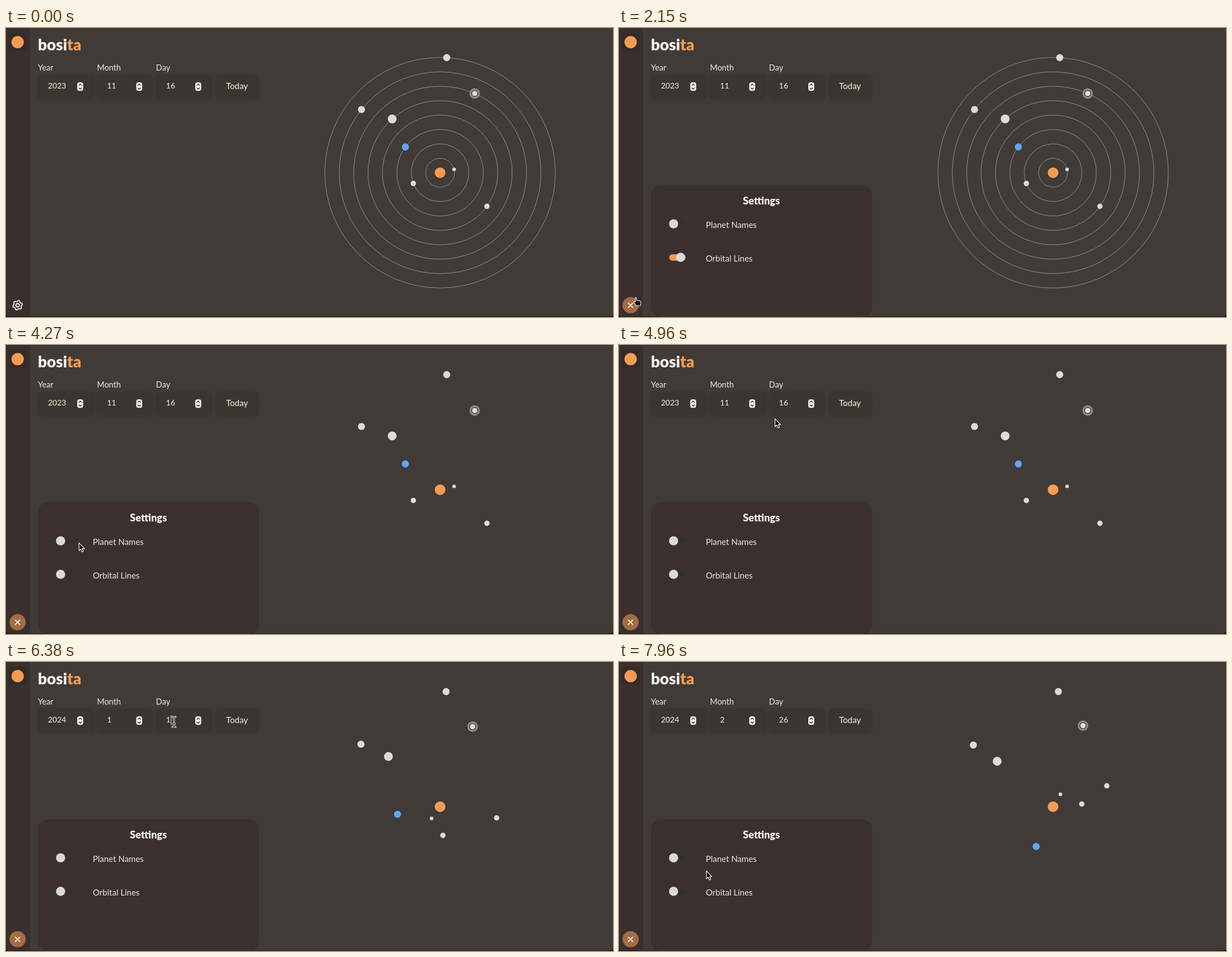
Write an HTML page that moves like this. It is 1084x516 px and loops after 8000 ms.

```html
<!DOCTYPE html>
<html lang="en">
<head>
<meta charset="utf-8">
<title>Orrery</title>
<style>
  html, body { margin: 0; width: 100%; height: 100%; overflow: hidden; background: #1b1817; }
  svg { display: block; width: 1084px; height: 516px; font-family: Lato, "Open Sans", sans-serif; }
  .label { font-size: 14.5px; fill: #e9e7e5; }
  .value { font-size: 14px; fill: #fbf3d9; }
  .row { font-size: 15px; fill: #e9e7e5; }
  .head { font-size: 18.2px; font-weight: 900; fill: #f1efee; }
  .title { font-size: 28px; font-weight: 900; fill: #f3f1f0; }
  .field { fill: #3a3531; filter: drop-shadow(0 1px 2px rgba(0, 0, 0, .16)); }
  .line { fill: none; stroke-linecap: round; stroke-linejoin: round; }
  .ink { fill: #111; stroke: #fff; stroke-width: 1.1; stroke-linejoin: round; }
</style>
</head>
<body>
<svg id="stage" viewBox="0 0 1084 516" xmlns="http://www.w3.org/2000/svg">
  <path d="M0 0H1084V509a6 6 0 0 1-6 6H6a6 6 0 0 1-6-6z" fill="#403b37"/>
  <path d="M0 0H43V515H6a6 6 0 0 1-6-6z" fill="#392f2d"/>
  <rect x="5" y="9" width="32" height="32" rx="5" fill="#342b28"/>
  <circle cx="20.8" cy="25.2" r="11" fill="#f59b54"/>

  <text class="title" x="57" y="39.5">bosi<tspan fill="#f59b54">ta</tspan></text>
  <g id="form"></g>
  <text class="row" x="393" y="108.5" style="fill:#fbf3d9">Today</text>
  <path id="caret" d="M0 95V113" stroke="#f3efe2"/>

  <g id="panel">
    <rect x="57" y="281" width="395" height="235" rx="18" fill="#3a302e"/>
    <text class="head" x="254.3" y="314.7" text-anchor="middle">Settings</text>
    <text class="row" x="155" y="357">Planet Names</text>
    <text class="row" x="155" y="417">Orbital Lines</text>
    <g id="switches"></g>
  </g>

  <circle id="hover" cx="20.7" cy="495" r="14.5" fill="#a56c42"/>
  <g id="gear" class="line" stroke="#f1efee" stroke-width="1.8"></g>
  <path id="cross" class="line" d="M16.6 491.2l8 8m0-8l-8 8" stroke="#f4f1ef" stroke-width="1.9"/>

  <g id="orbits" fill="none" stroke="#928e8b"></g>
  <circle cx="775.2" cy="258.4" r="9.5" fill="#f59b54"/>
  <g id="planets"></g>

  <g id="pointer">
    <path id="arrow" class="ink" d="M0 0V14L3.2 11.2 5.4 16.2 7.8 15.2 5.7 10.3H10z"/>
    <path id="hand" class="ink" d="M-1 8V1Q0-1 1 1V5L7 6 9 8V11L8 15H1L-4 8-2 7z"/>
    <g id="beam" class="line"></g>
  </g>
</svg>
<script>
const $ = id => document.getElementById(id);
const LOOP = 8000, CX = 775.2, CY = 258.4, GAP = 25.73, RAD = Math.PI / 180;

function add(parent, tag, attrs, text) {
  const el = document.createElementNS('http://www.w3.org/2000/svg', tag);
  for (const k in attrs) el.setAttribute(k, attrs[k]);
  if (text) el.textContent = text;
  return parent.appendChild(el);
}
const show = (el, on) => { el.style.display = on ? '' : 'none'; };
const clamp = (v, lo, hi) => Math.max(lo, Math.min(hi, v));

// date fields and the button
const form = $('form');
const values = ['Year', 'Month', 'Day'].map((name, i) => {
  const x = 57 + i * 105.4;
  add(form, 'text', { class: 'label', x, y: 76 }, name);
  add(form, 'rect', { class: 'field', x, y: 84, width: 100, height: 41, rx: 6 });
  add(form, 'rect', { x: x + 70.2, y: 97, width: 10.6, height: 15.2, rx: 4, fill: '#f4f3f2' });
  add(form, 'path', {
    class: 'line', stroke: '#2a2725', 'stroke-width': 1.3,
    d: `M${x + 73.2} 102.4l2.3-2.4 2.3 2.4m-4.6 4.6l2.3 2.4 2.3-2.4`
  });
  return add(form, 'text', { class: 'value', x: x + 18, y: 108.3 });
});
add(form, 'rect', { class: 'field', x: 375, y: 84, width: 76, height: 41, rx: 6 });

// settings switches
function makeSwitch(y) {
  const track = add($('switches'), 'rect', { x: 90, y: y - 5, width: 28.5, height: 10.4, rx: 5.2 });
  const knob = add($('switches'), 'circle', { cy: y, r: 8.2, fill: '#dbd9d8' });
  return on => {
    track.setAttribute('fill', on ? '#f59b54' : '#342e2c');
    track.setAttribute('stroke', on ? '#f59b54' : '#2f3938');
    knob.setAttribute('cx', on ? 110 : 97.5);
  };
}
const setNames = makeSwitch(349.6), setLines = makeSwitch(409.5);

// six-toothed gear
const teeth = Array.from({ length: 24 }, (_, i) => {
  const a = (i * 15 + 7.5) * RAD, r = i % 4 < 2 ? 8.6 : 6.7;
  return [20.7 + r * Math.sin(a), 495 - r * Math.cos(a)];
});
add($('gear'), 'polygon', { points: teeth.join(' ') });
add($('gear'), 'circle', { cx: 20.7, cy: 495, r: 3 });

// text pointer: light outline under a dark stroke
for (const [stroke, width] of [['#fff', 2.8], ['#222', 1.1]])
  add($('beam'), 'path', { d: 'M-3-9Q0-9 0-7Q0-9 3-9M0-7V7M-3 9Q0 9 0 7Q0 9 3 9M-1.5 3.5H1.5', stroke, 'stroke-width': width });

// mean angle on the first day, degrees per day; perihelion where the orbit is clearly eccentric
const planets = [
  { angle: 25.4, rate: 4.092, size: 3.2, ecc: .206, peri: 167.5 },
  { angle: 201.9, rate: 1.603, size: 4.8 },
  { angle: 143.4, rate: 1.0147, size: 6.3, fill: '#60a5fa' },
  { angle: 335, rate: .524, size: 4.8, ecc: .0934, peri: 66 },
  { angle: 131.7, rate: .09, size: 7.9 },
  { angle: 66.4, rate: .0327, size: 4.8, ringed: true },
  { angle: 141.2, rate: .0105, size: 6.3 },
  { angle: 86.7, rate: .0066, size: 6.3 }
];
planets.forEach((p, i) => {
  p.r = GAP * (i + 1);
  add($('orbits'), 'circle', { cx: CX, cy: CY, r: p.r });
  p.el = add($('planets'), 'g', {});
  if (p.ringed) add(p.el, 'circle', { r: 7.8, fill: '#403b37', stroke: '#8f8b89', 'stroke-width': 3.2 });
  add(p.el, 'circle', { r: p.size, fill: p.fill || '#dddbda' });
});

function placePlanets(day) {
  for (const { angle, rate, ecc = 0, peri = 0, r, el } of planets) {
    const m = (angle + rate * day - peri) * RAD;
    let e = m;
    for (let k = 0; k < 6; k++) e = m + ecc * Math.sin(e);
    const a = peri * RAD + Math.atan2(Math.sqrt(1 - ecc * ecc) * Math.sin(e), Math.cos(e) - ecc);
    el.setAttribute('transform', `translate(${CX + r * Math.cos(a)} ${CY - r * Math.sin(a)})`);
  }
}

// pointer moves: start, end, x, y
const moves = [
  [230, 650, 79, 493],
  [850, 1190, 15, 491],
  [2135, 2310, 101, 434],
  [2580, 3000, 110, 408],
  [4230, 4420, 163, 266],
  [4610, 5190, 300, 107],
  [7620, 7960, 156, 373]
];
function pointerAt(t) {
  let x = 461, y = 106;
  for (const [from, to, tx, ty] of moves) {
    const p = 1 - (1 - clamp((t - from) / (to - from), 0, 1)) ** 2;
    x += (tx - x) * p;
    y += (ty - y) * p;
  }
  return [x, y];
}

function draw(t) {
  // the day counts up while the key is held
  const day = clamp(Math.floor((t - 5595) * .059), 0, 102);
  const date = new Date(Date.UTC(2023, 10, 16 + day));
  const parts = [date.getUTCFullYear(), date.getUTCMonth() + 1, date.getUTCDate()].map(String);
  parts.forEach((s, i) => { values[i].textContent = s; });
  placePlanets(day);

  show($('caret'), t >= 5190 && t < 7690);
  $('caret').setAttribute('transform', `translate(${286.8 + 8.1 * parts[2].length} 0)`);

  const open = t >= 1580, lines = t < 3960;
  show($('panel'), open);
  show($('cross'), open);
  show($('gear'), !open);
  show($('orbits'), lines);
  setNames(false);
  setLines(lines);
  $('hover').style.opacity = clamp((t - 1040) / 150, 0, 1);

  const [x, y] = pointerAt(t);
  const hand = Math.hypot(x - 20.7, y - 495) < 18;
  const beam = y > 84 && y < 125 && x > 268 && x < 335;
  $('pointer').setAttribute('transform', `translate(${x} ${y})`);
  show($('pointer'), t >= 230);
  show($('hand'), hand);
  show($('beam'), beam);
  show($('arrow'), !hand && !beam);
}

const start = performance.now();
function tick() {
  draw((performance.now() - start) % LOOP);
  requestAnimationFrame(tick);
}
tick();
</script>
</body>
</html>
```
